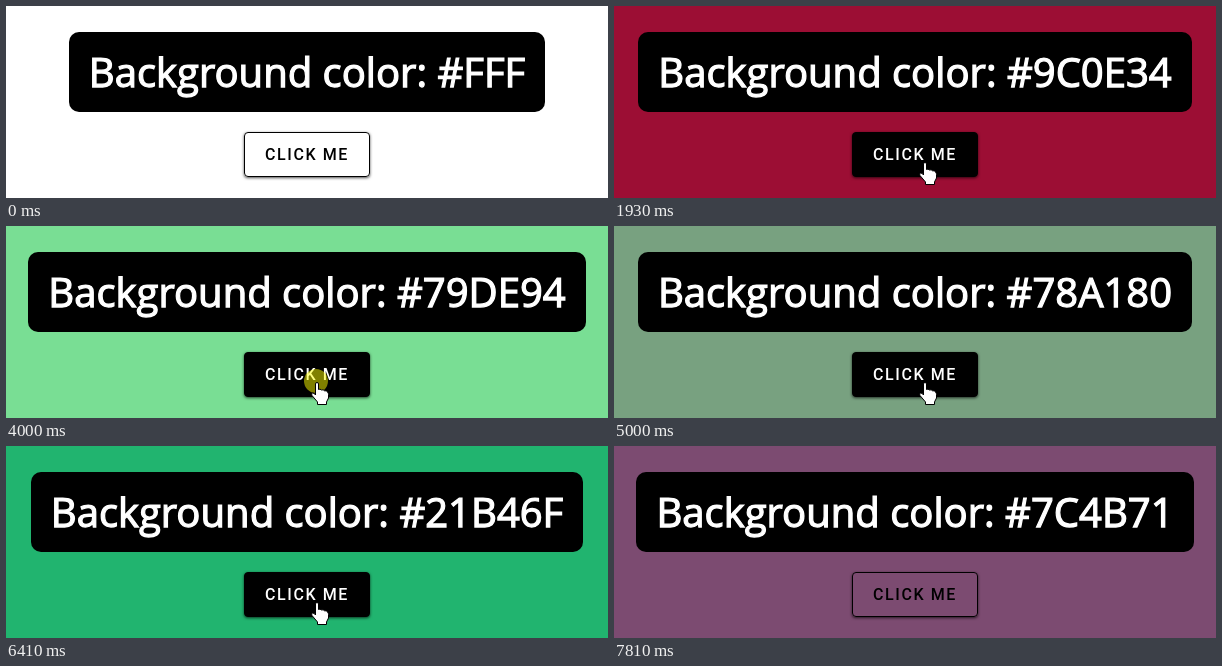
An HTML page that plays this animation: 602x192 px, repeating every 7890 ms.

```html
<!DOCTYPE html>
<html lang="en">
<head>
<meta charset="utf-8">
<title>Random background color</title>
<style>
  html, body { margin: 0; width: 100%; height: 100%; overflow: hidden; }
  body { position: relative; background: #fff; }
  header { position: absolute; top: 26px; left: 0; width: 602px; text-align: center; }
  h2 {
    display: inline-block; margin: 0; padding: 20px; border-radius: 10px;
    background: #000; color: #fff; white-space: nowrap;
    font: 400 40px/40px "Open Sans", sans-serif;
    -webkit-text-stroke: 1.25px #fff;
  }
  #button {
    position: absolute; left: 238px; top: 126px; width: 126px; height: 45px;
    box-sizing: border-box; padding-left: 20px; border: 1px solid #000; border-radius: 4px;
    box-shadow: 0 1px 3px rgba(0, 0, 0, .7);
    font: 500 16px/43px Roboto, sans-serif; letter-spacing: 1.6px;
    color: #000; white-space: nowrap;
  }
  #button.hover { background: #000; color: #fff; }
  svg { position: absolute; left: 0; top: 0; }
</style>
</head>
<body>
<header><h2>Background color: <span id="code">#FFF</span></h2></header>
<div id="button">CLICK ME</div>
<svg width="602" height="192" viewBox="0 0 602 192">
  <circle id="press" r="12" fill="#ff0" fill-opacity=".5"/>
  <g id="cursor" fill="#fff" stroke="#000" stroke-linejoin="round">
    <path id="hand" transform="translate(-6 -1)" d="M4.5 14V3a1.5 1.5 0 0 1 3 0V8.5q1.5-1 3 .5q1.8-.8 3 .8q2-.6 3.2 1.4q.8 1 .8 2.3V17l-2 4v2.5H6.500V21L1 14.500Q0 12.500 1.500 12q1.500-.3 3 2Z"/>
    <path id="arrow" d="M0 0V16L4 12.500L6.500 18.500L9 17.500L6.500 11.500H11.500Z"/>
  </g>
</svg>
<script>
const LOOP = 7890;
const PRESS = 160;
const HOME = [311, 156];
const AWAY = [326, 204];
const ENTER = [400, 850];
const LEAVE = [7050, 7600];
const colors = [
  [0, "#FFF"], [1150, "#9C0E34"], [2340, "#DB5C35"], [3300, "#79DE94"],
  [4080, "#78A180"], [5420, "#21B46F"], [6730, "#7C4B71"]
];

const $ = id => document.getElementById(id);
const show = (el, on) => el.setAttribute("visibility", on ? "visible" : "hidden");

function progress(t, [from, to]) {
  const p = Math.min(1, Math.max(0, (t - from) / (to - from)));
  return p * p * (3 - 2 * p);
}

function render(t) {
  const color = colors.filter(([at]) => at <= t).pop()[1];
  document.body.style.background = color;
  if ($("code").textContent !== color) $("code").textContent = color;

  const near = progress(t, ENTER) - progress(t, LEAVE);
  const [x, y] = HOME.map((home, i) => AWAY[i] + (home - AWAY[i]) * near);
  const hover = y < 171;
  $("button").classList.toggle("hover", hover);
  $("cursor").setAttribute("transform", `translate(${x} ${y})`);
  show($("hand"), hover);
  show($("arrow"), !hover);

  // The mark is visible while the mouse is down; releasing changes the color.
  const pressed = colors.some(([at]) => t >= at - PRESS + 10 && t < at);
  $("press").setAttribute("cx", x - 1);
  $("press").setAttribute("cy", y - 1);
  show($("press"), pressed);
}

const start = performance.now();
function tick() {
  render((performance.now() - start) % LOOP);
  requestAnimationFrame(tick);
}
tick();
</script>
</body>
</html>
```
